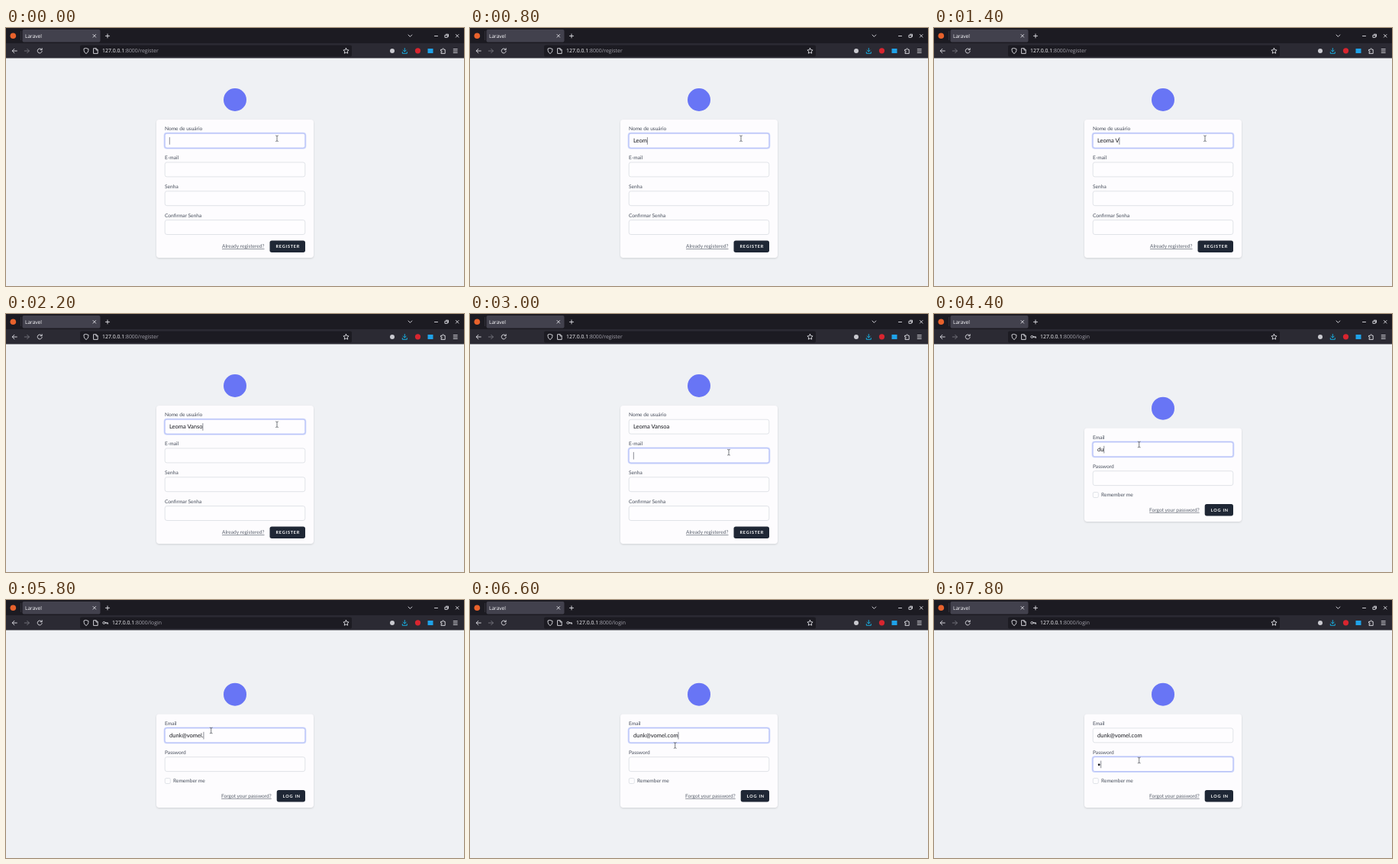
Recreate the animation shown at these times as an HTML page. Size 600 by 338 pixels, loop 8 s.

```html
<!DOCTYPE html>
<html lang="pt">
<head>
<meta charset="utf-8">
<style>
html, body { margin: 0; width: 100%; height: 100%; overflow: hidden; background: #eff1f4; }
svg { display: block; width: 100vw; height: 100vh; }
text { font: 6.6px Lato, sans-serif; fill: #454c59; white-space: pre; text-rendering: geometricPrecision; }
.ui { font: 6.6px "Open Sans", "Noto Sans", sans-serif; fill: #fbfbfe; }
.url { font-size: 6.9px; fill: #a3a2ab; }
.value { font-size: 7.55px; fill: #15171c; }
.link { fill: #59606c; text-decoration: underline; text-anchor: end; }
.button { font-size: 5.5px; font-weight: bold; letter-spacing: .8px; fill: #fff; }
.card { fill: #fdfcfe; filter: drop-shadow(0 1.4px 1.2px rgba(0, 0, 0, .13)); }
.field { fill: #fefdff; stroke: #d5d8de; stroke-width: .7; }
.field.focus { stroke: #a0aef5; }
.ring { fill: none; stroke: #ccd5fb; stroke-width: 1.6; }
.icon { fill: none; stroke: #e2e2e8; stroke-width: .9; stroke-linecap: round; stroke-linejoin: round; }
</style>
</head>
<body>
<svg viewBox="0 0 600 338" preserveAspectRatio="none">
  <rect width="600" height="338" fill="#eff1f4"/>
  <rect width="600" height="39.5" fill="#2b2a33"/>
  <rect width="600" height="20" fill="#1c1b22"/>
  <rect x="21.5" y="2" width="102" height="16.5" rx="2" fill="#42414d"/>
  <rect x="97" y="22.5" width="356" height="15" rx="2" fill="#1c1b22"/>
  <path d="M19.5 4V16" stroke="#3a3944" stroke-width=".7"/>
  <text class="ui" x="25" y="12.9">Laravel</text>

  <circle cx="9.3" cy="10.3" r="3.8" fill="#e8622c"/>
  <circle cx="506" cy="30" r="3" fill="#c9c9cf"/>
  <circle cx="539.5" cy="29.8" r="3.6" fill="#d8252f"/>
  <rect x="552.5" y="27" width="7" height="6" fill="#1fa2e8"/>

  <g class="icon">
    <path d="M114 8.5l3.6 3.6m0-3.6l-3.6 3.6M130.5 10.4h5M133 7.9v5"/>
    <path d="M527 9l2.4 2.4L531.800 9M561.500 10.500h4M575.300 9.300h3v3h-3zM576.500 8.200h3v3M589.400 8.500l3.600 3.600m0-3.600l-3.600 3.600"/>
    <path d="M14.300 30H8.300m2.600-2.700L8.200 30l2.700 2.700"/>
    <path d="M24.300 30h6m-2.600-2.700l2.700 2.700-2.700 2.700" stroke="#77767f"/>
    <path d="M46.700 28.200a3 3 0 1 0 .5 2.300M47.200 26.700v2h-2"/>
    <path d="M105 26.500l3 1c0 3-.6 4.700-3 6-2.400-1.300-3-3-3-6z"/>
    <path d="M115 26.700h3.200l2 2v4.700H115zM118 26.900v2h2"/>
    <path d="M445.500 26.400l1.100 2.300 2.500.3-1.800 1.700.4 2.500-2.200-1.200-2.200 1.200.4-2.500-1.800-1.700 2.500-.3z"/>
    <path d="M522.300 26.500v4.500m-2-2l2 2 2-2M519.300 31.500v1.800h6v-1.800" stroke="#16b9ef"/>
    <path d="M570 28.300h1.700c-.5-2 2.300-2 1.900 0h1.600v5.100H570v-1.600c1.800.3 1.800-2 0-1.700z"/>
    <path d="M586.200 27.700h5M586.200 30h5M586.200 32.300h5"/>
  </g>
  <g id="key" class="icon"><circle cx="128.400" cy="29.900" r="1.500"/><path d="M130 29.900h3.500v1.400M132 30v1"/></g>
  <text id="url" class="ui url" y="32.400"><tspan fill="#fbfbfe">127.0.0.1</tspan>:8000/<tspan id="route"></tspan></text>

  <circle id="logo" cx="300" r="15" fill="#6875f5"/>
  <g id="register"></g>
  <g id="login"></g>
  <path id="caret" fill="none" stroke="#3c3f4a" stroke-width=".6" d="M0-4.800V4.800"/>
  <path id="pointer" fill="none" stroke="#55585f" stroke-width=".8"
    d="M-1.800-3.800Q0-3.800 0-2.800Q0-3.800 1.800-3.800M0-3V3M-1.800 3.800Q0 3.800 0 2.800Q0 3.800 1.800 3.800"/>
</svg>
<script>
const $ = id => document.getElementById(id);
const STEP = 200, STEPS = 40, PITCH = 37.8;
const NAME = "Leoma Vansoa", MAIL = "dunk@vomel.com";
const clamp = (v, max) => Math.max(0, Math.min(max, v));
const move = (el, x, y) => el.setAttribute("transform", `translate(${x} ${y})`);

// Builds a card with labelled fields, a link and a button.
function form(id, f) {
  let html = `<rect class="card" x="197" y="${f.top}" width="206" height="${f.height}" rx="3.7"/>`;
  f.labels.forEach((label, i) => {
    const y = f.first + i * PITCH;
    html += `<text x="208" y="${y - 3.9}">${label}</text>
      <rect class="ring" x="207.500" y="${y - .5}" width="185" height="20.300" rx="3"/>
      <rect class="field" x="208.200" y="${y + .2}" width="183.600" height="18.900" rx="2.600"/>
      <text class="value" x="214" y="${y + 12.4}"></text>`;
  });
  html += `<text class="link" x="${f.left - 7}" y="${f.foot + 9.900}">${f.link}</text>
    <rect x="${f.left}" y="${f.foot}" width="${392 - f.left}" height="15.500" rx="2.700" fill="#1f2735"/>
    <text class="button" x="${f.left + 8}" y="${f.foot + 9.700}">${f.button}</text>`;
  $(id).innerHTML = html + (f.extra || "");
  const all = s => [...$(id).querySelectorAll(s)];
  return { ...f, id, values: all(".value"), rings: all(".ring"), boxes: all(".field") };
}

const register = form("register", {
  top: 120, height: 181, first: 138, logo: 94, urlX: 126,
  labels: ["Nome de usuário", "E-mail", "Senha", "Confirmar Senha"],
  left: 345.5, foot: 278.4, link: "Already registered?", button: "REGISTER"
});
const login = form("login", {
  top: 149.5, height: 122.500, first: 167.700, logo: 123.700, urlX: 139,
  labels: ["Email", "Password"],
  left: 354.700, foot: 249, link: "Forgot your password?", button: "LOG IN",
  extra: `<rect class="field" x="208.300" y="233.500" width="7" height="7" rx="1.600"/>
    <text x="219" y="239.400">Remember me</text>`
});

function show(page, texts, focus, pointer, blink) {
  for (const p of [register, login]) $(p.id).style.display = p === page ? "" : "none";
  $("key").style.display = page === login ? "" : "none";
  $("route").textContent = page.id;
  $("url").setAttribute("x", page.urlX);
  $("logo").setAttribute("cy", page.logo);
  page.values.forEach((el, i) => {
    el.textContent = texts[i] || "";
    page.rings[i].style.display = i === focus ? "" : "none";
    page.boxes[i].classList.toggle("focus", i === focus);
  });
  const width = texts[focus] ? page.values[focus].getComputedTextLength() : 0;
  move($("caret"), 214.300 + width, page.first + focus * PITCH + 9.900);
  $("caret").style.display = blink ? "none" : "";
  move($("pointer"), ...pointer);
}

function draw(step) {
  if (step < 22) {
    const k = clamp((step - 12) / 2, 1);
    show(register, [NAME.slice(0, clamp(step, 12)), MAIL.slice(0, clamp(step - 17, 4))],
      step < 15 ? 0 : 1, [355 - 16 * k, 144.700 + 36.500 * k]);
  } else {
    const counts = [2, 4, 4, 5, 6, 8, 9, 11, 12, 14];
    const k = clamp((step - 32) / 2, 1);
    show(login, [MAIL.slice(0, counts[Math.min(step - 22, 9)]), step > 38 ? "•" : ""],
      step < 35 ? 0 : 1, [268.700, 171 + 39 * k], step === 38);
  }
}

let last = -1;
function tick() {
  const step = Math.floor(performance.now() / STEP) % STEPS;
  if (step !== last) draw(last = step);
  requestAnimationFrame(tick);
}
tick();
</script>
</body>
</html>
```
